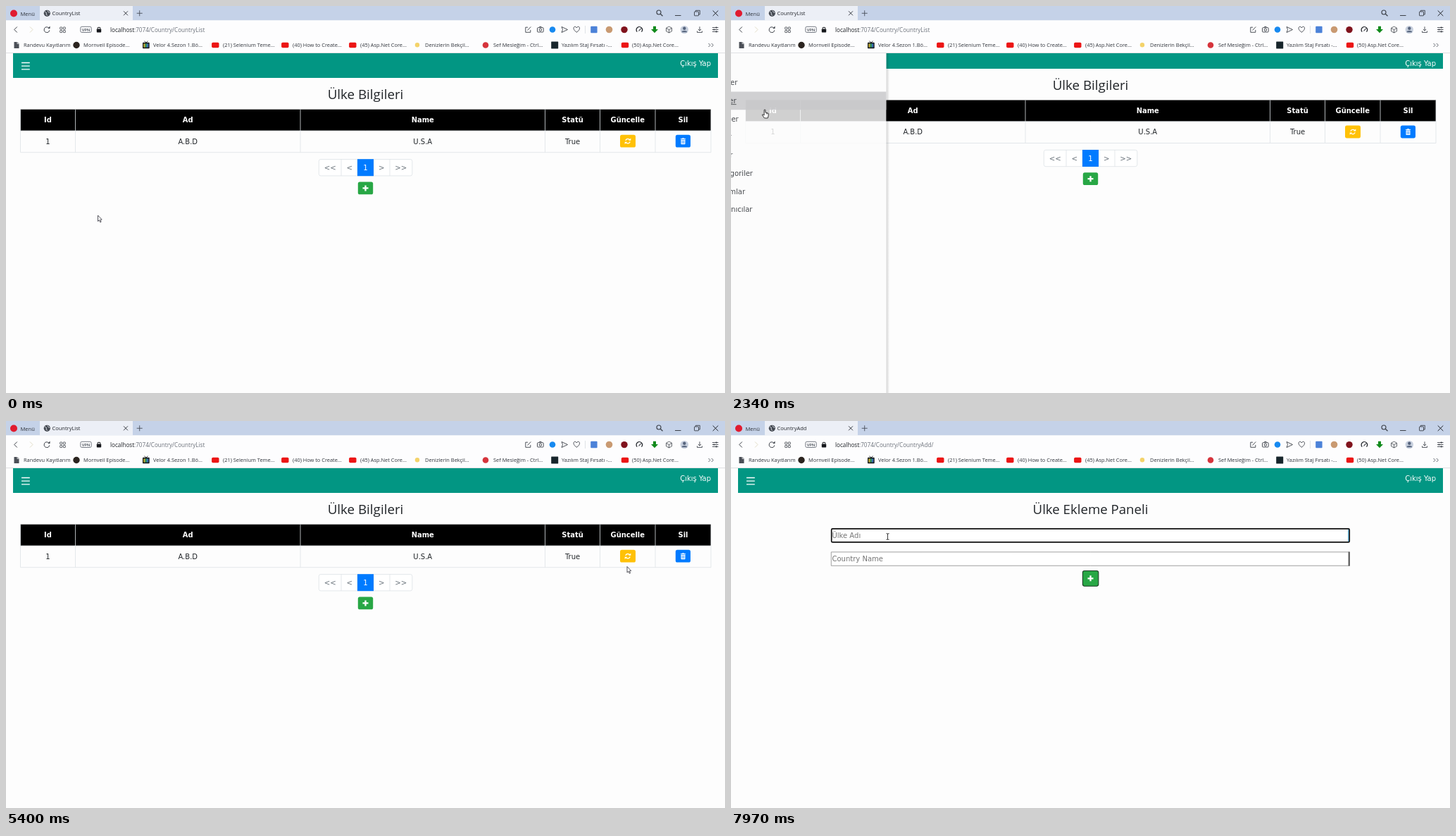
An HTML page with a canvas for the animation above (8 s loop, 1021x549 px).

```html
<!DOCTYPE html>
<html lang="tr">
<head>
<meta charset="utf-8">
<title>CountryList</title>
<style>
html, body { margin: 0; width: 100%; height: 100%; overflow: hidden; background: #fdfdfd; }
canvas { display: block; width: 100vw; height: 100vh; }
</style>
</head>
<body>
<canvas id="stage"></canvas>
<script>
const W = 1021, H = 549, LOOP = 8000;
const UI = '"Open Sans", "Noto Sans", sans-serif';
const BODY = '"DejaVu Sans", sans-serif';
const PAGE = '#fdfdfd', TEAL = '#029683', INK = '#212529', LINE = '#dee2e6', ICON = '#3c4048';

// moments when the state changes, in ms
const OPEN = 2090, SLIDE = 500, RELOAD = 3500, ADD = 6690, LOADED = 7050, FOCUS = 7700;

const canvas = document.getElementById('stage');
const c = canvas.getContext('2d');
const dpr = window.devicePixelRatio || 1;
canvas.width = Math.round(W * dpr);
canvas.height = Math.round(H * dpr);

// pointer path: time, x, y
const path = [
  [0, 130.5, 297], [900, 130.5, 297], [1340, 249.5, 231.5], [1800, 27, 84], [OPEN, 27, 84],
  [2340, 48, 147], [2700, 51, 161], [3600, 51, 161], [4220, 380, 325], [4950, 875, 212],
  [5400, 882, 206.5], [5640, 958, 212], [5820, 950, 214], [6300, 509, 257], [6660, 509, 257],
  [6800, 449.5, 252], [7400, 222.5, 164], [LOOP, 222.5, 164]
];

function pointer(t) {
  let i = 1;
  while (i < path.length - 1 && t > path[i][0]) i++;
  const [t0, x0, y0] = path[i - 1], [t1, x1, y1] = path[i];
  const u = Math.min(1, (t - t0) / (t1 - t0));
  const k = u * u * (3 - 2 * u);
  return { x: x0 + (x1 - x0) * k, y: y0 + (y1 - y0) * k };
}

const within = (p, x0, y0, x1, y1) => p.x >= x0 && p.x <= x1 && p.y >= y0 && p.y <= y1;

function rect(x0, y0, x1, y1, fill) {
  c.fillStyle = fill;
  c.fillRect(x0, y0, x1 - x0, y1 - y0);
}

function round(x0, y0, x1, y1, r, fill, stroke, lw = 1) {
  c.beginPath();
  c.roundRect(x0, y0, x1 - x0, y1 - y0, r);
  if (fill) { c.fillStyle = fill; c.fill(); }
  if (stroke) { c.strokeStyle = stroke; c.lineWidth = lw; c.stroke(); }
}

function disc(x, y, r, fill) {
  c.beginPath();
  c.arc(x, y, r, 0, 7);
  c.fillStyle = fill;
  c.fill();
}

function arc(x, y, r, a0, a1, color, lw = 1) {
  c.beginPath();
  c.arc(x, y, r, a0, a1);
  c.strokeStyle = color;
  c.lineWidth = lw;
  c.stroke();
}

// open polylines; each list is x, y, x, y, ...
function lines(color, lw, ...polys) {
  c.strokeStyle = color;
  c.lineWidth = lw;
  c.beginPath();
  for (const p of polys)
    for (let i = 0; i < p.length; i += 2) i ? c.lineTo(p[i], p[i + 1]) : c.moveTo(p[0], p[1]);
  c.stroke();
}

function shape(x, y, pts, fill, stroke, lw = 0.7) {
  c.beginPath();
  for (let i = 0; i < pts.length; i += 2) c.lineTo(x + pts[i], y + pts[i + 1]);
  c.closePath();
  if (fill) { c.fillStyle = fill; c.fill(); }
  if (stroke) { c.strokeStyle = stroke; c.lineWidth = lw; c.stroke(); }
}

function text(s, x, y, size, color = INK, family = BODY, align = 'left', weight = 400) {
  c.font = `${weight} ${size}px ${family}`;
  c.textAlign = align;
  c.fillStyle = color;
  c.fillText(s, x, y);
  return c.measureText(s).width;
}

const cross = (x, y, r, color, lw = 1) =>
  lines(color, lw, [x - r, y - r, x + r, y + r], [x - r, y + r, x + r, y - r]);
const plus = (x, y, r, color, lw) =>
  lines(color, lw, [x - r, y, x + r, y], [x, y - r, x, y + r]);
const bars = (x0, x1, y, gap, color, lw) =>
  lines(color, lw, ...[-1, 0, 1].map(k => [x0, y + k * gap, x1, y + k * gap]));

function drawTabs(t) {
  const loading = t >= ADD && t < LOADED;
  rect(0, 0, W, 20.5, '#c5d2e8');
  rect(48, 0, 180, 20.5, '#eceff6');
  disc(11, 10.5, 5, '#e01b30');
  text('Menü', 20.5, 13.5, 7.6, '#30343c', UI);
  if (loading) {
    arc(58, 10.3, 4, 0, 7, '#d2d5dc', 1);
    const a = t / 160;
    arc(58, 10.3, 4, a, a + 2, '#8b909a', 1);
    const fade = c.createLinearGradient(148, 0, 161, 0);
    fade.addColorStop(0, '#23262c');
    fade.addColorStop(1, 'rgba(35,38,44,0)');
    c.save();
    c.beginPath();
    c.rect(64, 0, 97, 20);
    c.clip();
    text('https://localhost:7074/Country', 65.5, 13.2, 7.5, fade, UI);
    c.restore();
  } else {
    disc(58.3, 10.3, 4.6, '#454a52');
    lines('#dfe3ea', 0.9, [55, 8, 57.5, 9.5, 57, 12, 59, 13.5], [59, 6.5, 60, 8.5, 62, 9.5]);
    text(t < ADD ? 'CountryList' : 'CountryAdd', 65.5, 13.2, 7.5, '#23262c', UI);
  }
  cross(170, 10.3, 3, ICON);
  plus(189.7, 10.3, 4, '#4a505c', 0.9);
  arc(927, 9, 3, 0, 7, ICON, 1.1);
  lines(ICON, 1.2, [929.3, 11.3, 932.5, 14.3]);
  lines(ICON, 1, [950, 13.5, 958.5, 13.5]);
  round(977.5, 8, 983.5, 13.8, 0.5, null, ICON, 0.9);
  lines(ICON, 0.9, [979.3, 8, 979.3, 6.3, 985.3, 6.3, 985.3, 12, 983.5, 12]);
  cross(1007.5, 10.3, 3.8, '#23262c');
}

function drawToolbar(t) {
  rect(0, 20.5, W, 67, '#fdfdfe');
  lines(ICON, 1, [15.8, 29.5, 11.8, 33.5, 15.8, 37.5]);
  lines('#e3ddc8', 1, [34, 29.5, 38, 33.5, 34, 37.5]);
  if (t >= ADD && t < LOADED) cross(58, 33.5, 3.2, ICON);
  else {
    arc(58, 33.7, 3.8, 0.2, 5.4, ICON, 1);
    shape(58, 33, [1.2, -1, 4.5, -1, 4.5, -4.4], ICON);
  }
  for (const x of [76.7, 81.3]) for (const y of [30, 34.6]) round(x, y, x + 3, y + 3, 0.4, null, ICON, 0.8);
  round(105.8, 29.3, 121.2, 37.5, 2, null, '#555b66', 0.8);
  text('VPN', 113.5, 35.7, 5.8, '#444a54', UI, 'center', 600);
  round(128.8, 32.5, 135.2, 37.6, 0.8, '#16181c');
  arc(132, 32.3, 2, Math.PI, 0, '#16181c', 1.1);
  const w = text('localhost', 148, 36.5, 8.15, '#1d2025', UI);
  text(':7074/Country/' + (t < ADD ? 'CountryList' : 'CountryAdd/'), 148 + w, 36.5, 8.15, '#6d727b', UI);

  lines(ICON, 0.9, [741, 30.2, 737.8, 30.2, 737.8, 37.3, 744.8, 37.3, 744.8, 34], [740.5, 34.5, 745.3, 29.5]);
  round(754.5, 30.7, 763.2, 37, 1, null, ICON, 0.9);
  lines(ICON, 0.9, [757, 30.5, 757.7, 29.4, 760, 29.4, 760.7, 30.5]);
  arc(758.9, 33.8, 1.7, 0, 7, ICON, 0.9);
  disc(776, 33.5, 4.3, '#1689f0');
  shape(793, 33.5, [-4, -4, 4.5, 0, -4, 4, -2.5, 0], null, ICON, 0.9);
  c.beginPath();
  c.moveTo(810.3, 37.3);
  c.bezierCurveTo(802, 31.5, 808, 26.5, 810.3, 31);
  c.bezierCurveTo(812.6, 26.5, 818.6, 31.5, 810.3, 37.3);
  c.stroke();
  lines('#d8dbe0', 0.8, [822.5, 28, 822.5, 39]);
  round(830.2, 28.7, 839.6, 38.2, 1, '#4c82d8');
  disc(856.5, 33.5, 4.8, '#c99a72');
  disc(878, 33.6, 4.7, '#80131d');
  arc(899.3, 33.8, 4.2, 2.4, 7, '#23262c', 1.3);
  lines('#23262c', 1.1, [898.5, 35.5, 901.5, 32]);
  shape(921, 33.5, [-2, -4.8, 2, -4.8, 2, -0.5, 5, -0.5, 0, 4.8, -5, -0.5, -2, -0.5], '#118a1c');
  shape(941.5, 33.5, [0, -4.4, 4, -2.2, 4, 2.3, 0, 4.5, -4, 2.3, -4, -2.2], null, ICON, 0.8);
  lines(ICON, 0.8, [937.5, 31.3, 941.5, 33.5, 945.5, 31.3], [941.5, 33.5, 941.5, 38]);
  disc(963.3, 33.6, 5.7, '#c8d0de');
  disc(963.3, 31.8, 2.2, '#56647d');
  c.beginPath();
  c.ellipse(963.3, 37.2, 3.8, 2.2, 0, Math.PI, 0);
  c.fillStyle = '#56647d';
  c.fill();
  lines(ICON, 0.9, [985, 29.3, 985, 35], [982.8, 32.9, 985, 35.1, 987.2, 32.9], [981.5, 35.5, 981.5, 37.4, 988.5, 37.4, 988.5, 35.5]);
  bars(1003, 1011.5, 33.5, 2.9, ICON, 0.9);
  for (const [x, y] of [[1008.7, 30.6], [1005.5, 33.5], [1008.7, 36.4]]) disc(x, y, 1.1, ICON);
}

const bookmarks = [
  [25, 'Randevu Kayıtlarım'], [110, 'Mornveil Episode...'], [209, 'Velor 4.Sezon 1.Bö...'],
  [308, '(21) Selenium Teme...'], [407, '(40) How to Create...'], [503, '(45) Asp.Net Core...'],
  [595, 'Denizlerin Bekçil...'], [692, 'Sef Mesleğim - Ctrl...'],
  [789, 'Yazılım Staj Fırsatı -...'], [889, '(50) Asp.Net Core...']
];

function drawBookmarks() {
  for (const [x, label] of bookmarks) text(label, x, 58.2, 7.42, '#30343b', UI);
  shape(11.5, 51, [0, 0, 4.5, 0, 7, 2.5, 7, 9, 0, 9], '#4b4f57');
  lines('#fdfdfe', 0.7, [16, 51, 16, 53.5, 18.5, 53.5]);
  disc(100, 55.5, 4.7, '#2b241f');
  round(194, 51.8, 203.7, 60.2, 0.8, '#15181b');
  lines('#15181b', 0.9, [196.5, 49.8, 199, 52, 201.5, 49.8]);
  ['#d9c23a', '#39a96b', '#3b77c9'].forEach((color, i) => rect(195.4 + i * 2.4, 53.4, 197.4 + i * 2.4, 58.6, color));
  for (const x of [297.3, 396.3, 492.3, 879]) round(x - 5.2, 51.8, x + 5.2, 59.2, 1.8, '#ec1515');
  disc(584, 55.3, 3.2, '#f4d36a');
  disc(681, 55.5, 4.3, '#d6343c');
  round(774.2, 50.5, 784.2, 60.5, 0.4, '#17252b');
  lines('#4b515a', 0.9, [997.5, 53, 1000, 55.5, 997.5, 58], [1001.8, 53, 1004.3, 55.5, 1001.8, 58]);
  lines('#d5d7da', 0.8, [0, 66.6, W, 66.6]);
}

const cols = [20.5, 98.5, 418, 765.5, 843.5, 922, 1001];
const heads = ['Id', 'Ad', 'Name', 'Statü', 'Güncelle', 'Sil'];
const cells = ['1', 'A.B.D', 'U.S.A', 'True'];
const mid = i => (cols[i] + cols[i + 1]) / 2;

function refreshIcon(x, y) {
  arc(x, y, 3.2, 3.4, 5.7, '#fff', 1.3);
  arc(x, y, 3.2, 0.25, 2.6, '#fff', 1.3);
  shape(x, y, [1, -1, 4.3, -1, 4.3, -4.2], '#fff');
  shape(x, y, [-1, 1, -4.3, 1, -4.3, 4.2], '#fff');
}

function trashIcon(x, y) {
  rect(x - 3.6, y - 3.7, x + 3.6, y - 2.7, '#fff');
  rect(x - 1.3, y - 4.5, x + 1.3, y - 3.5, '#fff');
  round(x - 3, y - 2.1, x + 3, y + 4.4, 0.6, '#fff');
  lines('#007bff', 0.6, ...[-1.5, 0, 1.5].map(d => [x + d, y - 1, x + d, y + 3.3]));
}

function drawList(shift) {
  c.save();
  c.translate(0, -shift);
  text('Ülke Bilgileri', 510.5, 132, 18.8, INK, UI, 'center');
  rect(20.5, 146.7, 1001, 177, '#000');
  lines(LINE, 0.8, ...cols.map(x => [x, 146.7, x, 207.7]), [20.5, 177, 1001, 177], [20.5, 207.7, 1001, 207.7]);
  heads.forEach((s, i) => text(s, mid(i), 165.2, 9.95, '#fff', BODY, 'center', 700));
  cells.forEach((s, i) => text(s, mid(i), 195.5, 10, INK, BODY, 'center'));
  round(872, 182.8, 894, 200.6, 2.6, '#ffc107');
  refreshIcon(883, 191.7);
  round(950.8, 182.8, 972, 200.6, 2.6, '#007bff');
  trashIcon(961.5, 191.8);

  round(444.3, 217.5, 576.8, 240.9, 2.6, '#fff', LINE, 0.8);
  lines(LINE, 0.8, ...[476, 499, 522, 545].map(x => [x, 217.5, x, 240.9]));
  rect(499, 217.2, 522, 241.2, '#007bff');
  ['<<', '<', '1', '>', '>>'].forEach((s, i) =>
    text(s, [460.3, 487.7, 510.5, 533.3, 560.8][i], 233, 10.2, i === 2 ? '#fff' : '#6c757d', BODY, 'center'));
  round(499.8, 249.5, 521.2, 267.3, 2.6, '#28a745');
  plus(510.5, 258.4, 4, '#fff', 2.3);
  c.restore();
}

function field(y, label, focused) {
  rect(142, y, 879, y + 20, '#fff');
  if (focused) {
    lines('#1b9be0', 1, [876.8, y + 1, 876.8, y + 19]);
    round(142.7, y + 0.5, 878.2, y + 19.5, 1.5, null, '#101010', 1.7);
  } else {
    round(142.3, y + 0.3, 878.5, y + 19.7, 0, null, '#8a8a8a', 0.8);
    rect(876.6, y, 878.7, y + 20, '#5c5c5c');
  }
  text(label, 143.5, y + 13.8, 10, '#757575');
}

function drawForm(focused) {
  text('Ülke Ekleme Paneli', 510.5, 132, 18.65, INK, UI, 'center');
  field(152.4, 'Ülke Adı', focused);
  field(185.6, 'Country Name', false);
  round(499.4, 212.5, 521.8, 234.2, 2.6, '#28a745', '#1c3d25', 1.1);
  plus(510.5, 223.3, 4, '#fff', 2.3);
}

const items = ['Filmler', 'Diziler', 'Ülkeler', 'Yıllar', 'Diller', 'Kategoriler', 'Yorumlar', 'Kullanıcılar'];
const itemY = i => 108.7 + i * 25.7;
const hovered = p => items.findIndex((s, i) => Math.abs(p.y - itemY(i)) <= 12.85);

function drawMenu(k, p) {
  const x = 10 - 255 * (1 - k), right = x + 255;
  if (right <= 0) return;
  rect(0, 67, right, 89, PAGE);
  c.save();
  c.beginPath();
  c.rect(0, 67, W, H - 67);
  c.clip();
  c.globalAlpha = k;
  const glow = c.createLinearGradient(right, 0, right + 5, 0);
  glow.addColorStop(0, 'rgba(0,0,0,.2)');
  glow.addColorStop(1, 'rgba(0,0,0,0)');
  rect(right, 67, right + 5, H, glow);
  const edge = c.createLinearGradient(x - 4, 0, x, 0);
  edge.addColorStop(0, 'rgba(0,0,0,0)');
  edge.addColorStop(1, 'rgba(0,0,0,.14)');
  rect(x - 4, 67, x, H, edge);
  rect(x, 67, right, H, PAGE);
  bars(x + 10.8, x + 21.2, 81.7, 3.8, '#16181b', 1.7);
  const hot = p.x < right ? hovered(p) : -1;
  items.forEach((s, i) => {
    const y = itemY(i);
    if (i === hot) rect(x, y - 12.85, right, y + 12.85, '#c8c8ca');
    const w = text(s, x + 10.6, y + 3.6, 10);
    if (i === hot) lines(INK, 0.8, [x + 10.6, y + 5.2, x + 10.6 + w, y + 5.2]);
  });
  c.restore();
}

function drawPointer(p, kind) {
  const { x, y } = p;
  c.lineJoin = 'round';
  if (kind === 'text') {
    lines('#222', 0.9, [x, y - 4, x, y + 4], [x - 2, y - 4.4, x, y - 4, x + 2, y - 4.4], [x - 2, y + 4.4, x, y + 4, x + 2, y + 4.4]);
  } else if (kind === 'hand') {
    shape(x, y, [-0.9, 0.4, 0, 0, 0.9, 0.5, 0.9, 4, 4.6, 5, 5.3, 6, 5, 9, 4.2, 12, -0.5, 12, -3.6, 7.8, -3.2, 6.8, -0.9, 8], '#fff', '#222', 0.9);
    lines('#222', 0.6, [2.3 + x, y + 4.6, 2.3 + x, y + 6.5], [3.7 + x, y + 5, 3.7 + x, y + 6.6]);
  } else {
    shape(x, y, [0, 0, 0, 8.4, 1.9, 6.8, 3.3, 9.8, 4.6, 9.2, 3.3, 6.3, 5.7, 6], '#fff', '#2b2b35', 0.8);
  }
  c.lineJoin = 'miter';
}

function pointerKind(t, p) {
  if (t >= ADD) return within(p, 142, 152, 879, 173) ? 'text' : 'default';
  if (t >= OPEN && t < RELOAD) return hovered(p) >= 0 || within(p, 20, 76, 34, 88) ? 'hand' : 'default';
  const links = [[20, 77, 35, 93], [872, 183, 894, 200], [951, 183, 972, 200], [500, 249, 521, 267]];
  return links.some(r => within(p, ...r)) ? 'hand' : 'default';
}

function draw(t) {
  const p = pointer(t), open = t >= OPEN && t < RELOAD;
  c.setTransform(canvas.width / W, 0, 0, canvas.height / H, 0, 0);
  rect(0, 0, W, H, PAGE);
  drawTabs(t);
  drawToolbar(t);
  drawBookmarks();
  rect(10, 67, 1011, open ? 89 : 102, TEAL);
  if (!open) bars(22, 33.8, 85.2, 4.7, '#fff', 1.3);
  text('Çıkış Yap', 1001, 85.3, 9.95, '#fff', BODY, 'right');
  if (t < ADD) drawList(open ? 13.2 : 0);
  else drawForm(t >= FOCUS);
  if (open) drawMenu(1 - Math.pow(1 - Math.min(1, (t - OPEN) / SLIDE), 2.5), p);
  drawPointer(p, pointerKind(t, p));
}

const start = performance.now();
function tick() {
  draw((performance.now() - start) % LOOP);
  requestAnimationFrame(tick);
}
tick();
</script>
</body>
</html>
```
